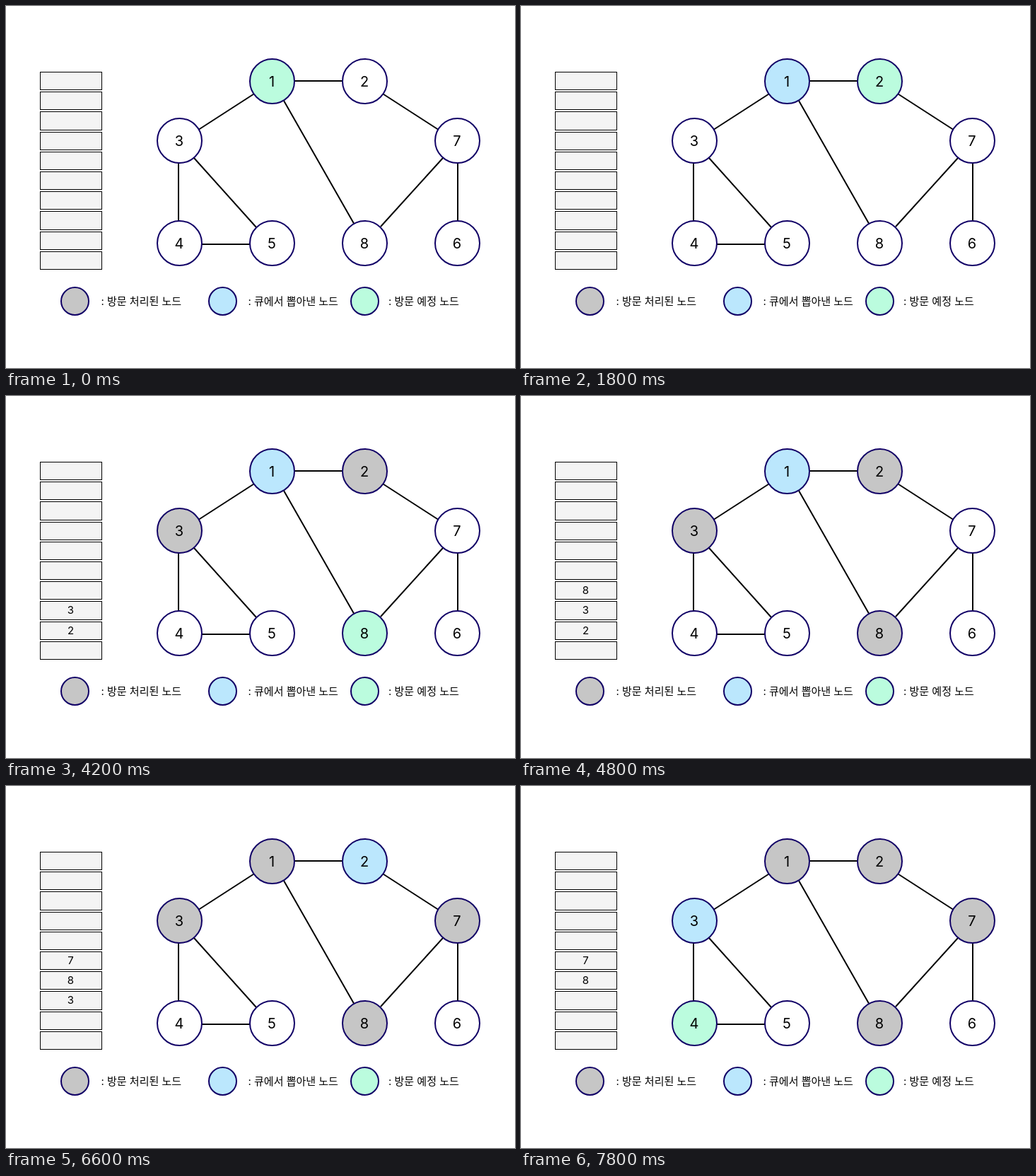
An HTML page that plays this animation: 720 by 512 pixels, repeating every 8 s.

```html
<!DOCTYPE html>
<html lang="ko">
<head>
<meta charset="utf-8">
<style>
  html, body { margin: 0; width: 100%; height: 100%; overflow: hidden; background: #fff; }
  svg { display: block; }
  text { font: 15px Inter, "Noto Sans CJK KR", "Noto Sans CJK", sans-serif; fill: #000; white-space: pre; }
  .mid { text-anchor: middle; }
  .node { font-size: 20px; }
</style>
</head>
<body>
<svg id="stage" width="720" height="512" viewBox="0 0 720 512"></svg>
<script>
const STEP = 600, LOOP = 8000, SLOTS = 10;
const WHITE = '#fff', VISITED = '#c6c6c6', CURRENT = '#bbe7fd', PLANNED = '#bbfcde', NAVY = '#110066';
const stage = document.getElementById('stage');

function add(tag, attrs, text = '') {
  const el = document.createElementNS('http://www.w3.org/2000/svg', tag);
  for (const key in attrs) el.setAttribute(key, attrs[key]);
  el.textContent = text;
  return stage.appendChild(el);
}
const disc = (cx, cy, r, fill) => add('circle', { cx, cy, r, fill, stroke: NAVY, 'stroke-width': 2 });

// Queue slots, counted from the bottom
const slotText = [];
for (let i = 0; i < SLOTS; i++) {
  const edge = 93 + 28.2 * (SLOTS - 1 - i);
  const top = Math.round(edge), bottom = Math.round(edge + 26.2);
  add('rect', { x: 48.5, y: top + .5, width: 87, height: bottom - top - 1, fill: '#f4f4f4', stroke: '#000' });
  slotText.push(add('text', { x: 91.5, y: top + 18, class: 'mid' }));
}

// Graph edges
add('path', {
  d: 'M408 106H476M350.5 124.5L273 174.5M393 134L492 307.5M533.5 124.5L611 174.5M244 221V305' +
     'M266 215L354 313M277 337H346M618 215L530 312M639 221V305',
  stroke: '#000', 'stroke-width': 2, fill: 'none'
});

// Graph nodes, labelled 1 to 8
const places = [[376.5, 106.5], [507.5, 106.5], [245.5, 190.5], [245.5, 335.5],
                [376.5, 335.5], [638.5, 335.5], [638.5, 190.5], [507.5, 335.5]];
const nodes = places.map(([x, y], i) => {
  const circle = disc(x, y, 31.5, WHITE);
  add('text', { x: x - .5, y: y + 7.3, class: 'mid node' }, i + 1);
  return circle;
});

// Legend
[[97.5, 134.5, VISITED, ': 방문 처리된 노드'],
 [306.5, 342.5, CURRENT, ': 큐에서 뽑아낸 노드'],
 [507.5, 541, PLANNED, ': 방문 예정 노드']].forEach(([cx, x, fill, label]) => {
  disc(cx, 417.5, 19.5, fill);
  add('text', { x, y: 423 }, label);
});

// p = plan a visit, q = mark visited and enqueue, d = dequeue
const events = 'p1 q1 d1 p2 p3 p8 q2 q3 q8 d2 p7 q7 d3 p4'.split(' ');

function show(step) {
  const fills = nodes.map(() => WHITE);
  const queue = [];
  let head = 0, current = null;
  for (const [kind, label] of events.slice(0, step + 1)) {
    const n = label - 1;
    if (kind === 'p') fills[n] = PLANNED;
    if (kind === 'q') {
      fills[n] = VISITED;
      queue.push(label);
    }
    if (kind === 'd') {
      if (current !== null) fills[current] = VISITED;
      fills[n] = CURRENT;
      current = n;
      head++;
    }
  }
  nodes.forEach((node, i) => node.setAttribute('fill', fills[i]));
  slotText.forEach((slot, i) => slot.textContent = i >= head && queue[i] || '');
}

let shown = -1;
function tick() {
  const step = Math.floor(performance.now() % LOOP / STEP);
  if (step !== shown) show(shown = step);
  requestAnimationFrame(tick);
}
tick();
</script>
</body>
</html>
```
